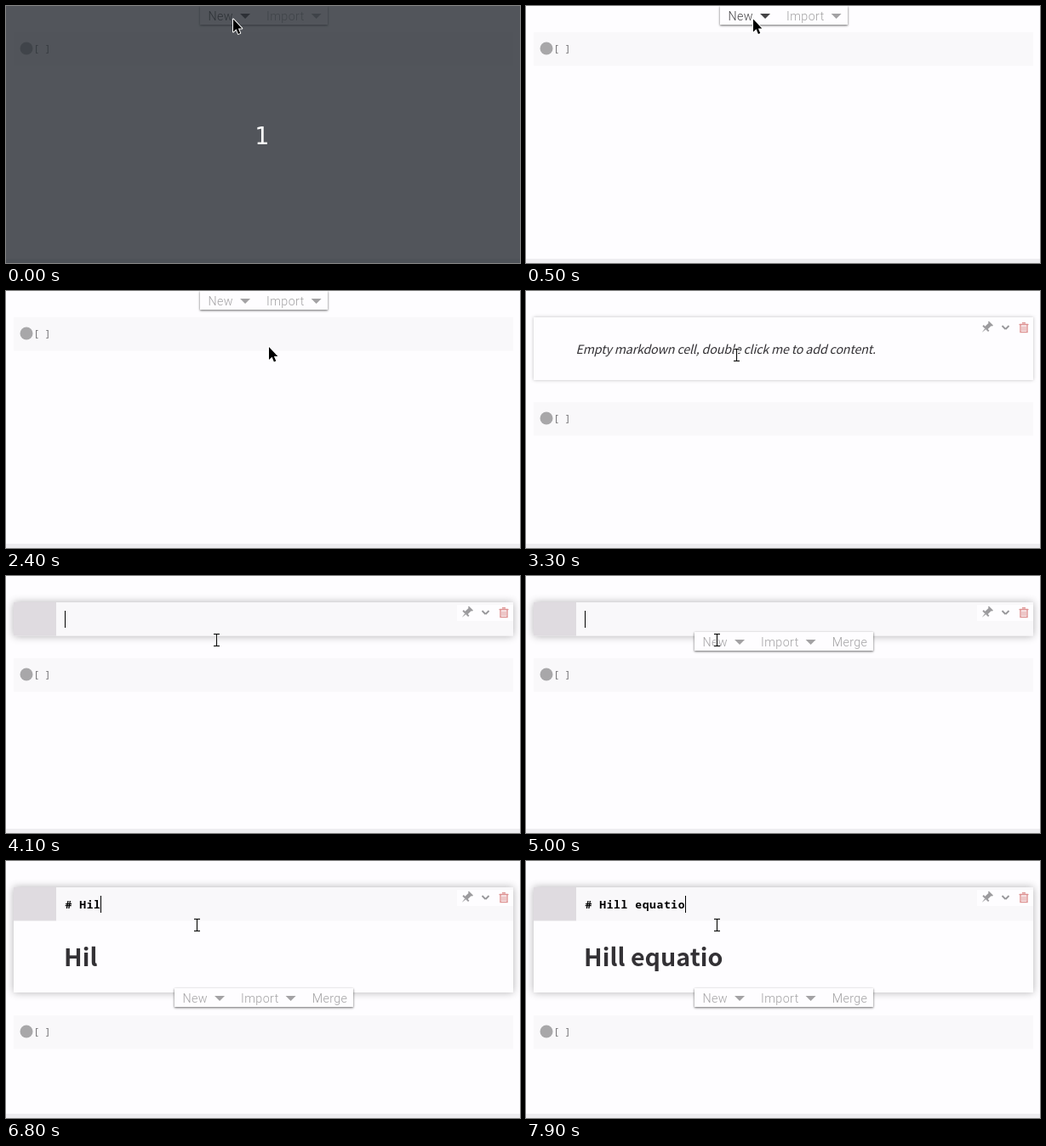
These frames come from a looping animation (604 by 303 pixels, 8 s). An HTML page with a canvas:

```html
<!DOCTYPE html>
<html lang="en">
<head>
<meta charset="utf-8">
<title>Notebook cell editing</title>
<style>
html, body { margin: 0; width: 100%; height: 100%; overflow: hidden; background: #fefdff; }
canvas { display: block; }
</style>
</head>
<body>
<canvas id="stage" width="604" height="303"></canvas>
<script>
const ctx = document.getElementById('stage').getContext('2d');
const LOOP = 8000, STEP = 100;
const SANS = '"Noto Sans CJK JP", "Noto Sans CJK SC", "Noto Sans CJK", "Open Sans", sans-serif';
const MONO = '"Noto Sans Mono", monospace';
const PAGE = '#fefdff', PALE = '#f9f8fa', GREY = '#a3a2a4';
const MENU = ['New Python Cell', 'New Markdown Cell', 'New Model Cell', 'New OMEX Cell'];
const SOURCE = '# Hill equatio';

const clamp = v => Math.max(0, Math.min(1, v));
const progress = (t, start, end) => clamp((t - start) / (end - start));
const easeOut = (p, power) => 1 - (1 - p) ** power;

function pointerAt(t) {
  const pick = progress(t, 1200, 1800);
  const leave = progress(t, 2600, 3100);
  const settle = progress(t, 3200, 3300);
  const aside = progress(t, 4700, 5000);
  return {
    x: 267 + 42 * easeOut(pick, 4) - 61.5 * leave - 23 * aside,
    y: 15.5 + 50.5 * easeOut(pick, 1.35) + 6 * leave + 3.5 * settle
  };
}

// Typing gets faster towards the end of the line.
function typedAt(t) {
  if (t < 5700) return 0;
  return 1 + Math.floor((SOURCE.length - 1) * progress(t, 5700, 7900) ** 1.695);
}

function box(x, y, w, h, fill) {
  ctx.fillStyle = fill;
  ctx.fillRect(x, y, w, h);
}

function shadowBox(x, y, w, h, fill, blur, alpha, dy = 0) {
  ctx.save();
  ctx.shadowColor = `rgba(0,0,0,${alpha})`;
  ctx.shadowBlur = blur;
  ctx.shadowOffsetY = dy;
  box(x, y, w, h, fill);
  ctx.restore();
}

function text(str, x, y, font, color, spacing = 0, stroke = 0) {
  ctx.font = font;
  ctx.letterSpacing = spacing + 'px';
  ctx.fillStyle = ctx.strokeStyle = color;
  ctx.fillText(str, x, y);
  if (stroke) {
    ctx.lineWidth = stroke;
    ctx.strokeText(str, x, y);
  }
}

function line(x0, y0, x1, y1, color, width) {
  ctx.beginPath();
  ctx.moveTo(x0, y0);
  ctx.lineTo(x1, y1);
  ctx.strokeStyle = color;
  ctx.lineWidth = width;
  ctx.stroke();
}

// Triangle with a flat top, pointing down.
function wedge(x, y, w, h, fill) {
  ctx.beginPath();
  ctx.moveTo(x, y);
  ctx.lineTo(x + w, y);
  ctx.lineTo(x + w / 2, y + h);
  ctx.fillStyle = fill;
  ctx.fill();
}

function codeCell(y) {
  box(9, y, 587, 39.5, PALE);
  ctx.beginPath();
  ctx.arc(24, y + 19, 7.5, 0, 7);
  ctx.fillStyle = '#a8a7a9';
  ctx.fill();
  text('[ ]', 32.5, y + 23, '11px ' + MONO, '#6b6a6c');
}

function toolbar(x, y, alpha, labels, hover) {
  if (!alpha) return;
  ctx.save();
  ctx.globalAlpha = alpha;
  const width = labels.length > 2 ? 210 : 150;
  for (const blur of [2, 3]) shadowBox(x, y, width, 22, PAGE, blur, 0.33, 1);
  let left = x + 9.5;
  for (const label of labels) {
    const color = hover && label === 'New' ? '#444345' : GREY;
    text(label, left, y + 17, '300 14.3px Roboto, sans-serif', color, 0.4);
    left += ctx.measureText(label).width;
    if (label !== 'Merge') wedge(left + 8, y + 9, 12, 6, color);
    left += 39;
  }
  ctx.restore();
}

function menu(pointerY) {
  const hot = Math.floor((pointerY - 18) / 29);
  shadowBox(260, 14, 186, 122, '#98979a', 4, 0.25, 1);
  box(261, 15, 184, 120, PAGE);
  MENU.forEach((label, i) => {
    const y = 17 + i * 29;
    if (i === hot) box(260, y, 186, 29, '#478ed6');
    text(label, 285.7, y + 20, '14.5px "Noto Sans", sans-serif', i === hot ? '#fff' : '#2c2e30', 0.07, 0.35);
  });
}

function pin(x, y, color) {
  ctx.save();
  ctx.translate(x, y);
  ctx.rotate(Math.PI / 4);
  box(-3.5, -7, 7, 1.6, color);
  box(-2.3, -6, 4.6, 7, color);
  box(-4.7, 0.5, 9.4, 2, color);
  wedge(-0.8, 2.5, 1.6, 5.5, color);
  ctx.restore();
}

function bin(x, y, color) {
  line(x - 5.5, y - 3.5, x + 5.5, y - 3.5, color, 1.2);
  line(x - 2, y - 5.3, x + 2, y - 5.3, color, 1.4);
  ctx.strokeRect(x - 4, y - 3.5, 8, 9);
  for (const dx of [-2, 0, 2]) line(x + dx, y - 1.5, x + dx, y + 4, color, 1);
}

function actions() {
  pin(541.5, 43, '#9c9b9e');
  for (const side of [-4, 4]) line(563.5 + side, 41, 563.5, 45, '#97969a', 1.8);
  bin(585, 43, '#dd9090');
}

function renderedCell(focused) {
  shadowBox(9, 31, 587, 74, PAGE, focused ? 9 : 4, focused ? 0.3 : 0.25);
  text('Empty markdown cell, double click me to add content.', 58.5, 74,
    'italic 14.3px ' + SANS, '#333135', -0.18);
  actions();
}

function editorCell(typed, previewHeight) {
  shadowBox(9, 31, 587, 39.5 + previewHeight, PAGE, 9, 0.3);
  box(9, 31, 50, 39.5, '#dfdbe0');
  box(59, 31, 537, 39.5, PALE);
  box(530, 34, 66, 19, PAGE);
  actions();
  text(SOURCE.slice(0, typed), 69.5, 55.5, 'bold 13px ' + MONO, '#000', 0.6);
  box(Math.round(69 + typed * 8.4), 41, 1, 20, '#000');
  text(SOURCE.slice(2, typed), 68, 124, 'bold 28.65px ' + SANS, '#333135');
}

function arrow(x, y) {
  ctx.save();
  ctx.translate(x, y);
  ctx.scale(0.94, 0.94);
  const shape = new Path2D('M0 0V16L3.8 12.6L6.3 18.6L8.8 17.5L6.3 11.7H11Z');
  ctx.lineJoin = 'round';
  ctx.strokeStyle = '#fff';
  ctx.lineWidth = 2;
  ctx.stroke(shape);
  ctx.fillStyle = '#000';
  ctx.fill(shape);
  ctx.restore();
}

function iBeam(x, y) {
  for (const [color, width] of [['#fff', 3], ['#111', 1.2]]) {
    line(x, y - 6.5, x, y + 6.5, color, width);
    for (const end of [-7, 7]) line(x - 3.5, y + end, x + 3.5, y + end, color, width);
  }
}

function countdown() {
  box(0, 0, 604, 303, 'rgba(39,44,51,0.8)');
  ctx.textAlign = 'center';
  text('1', 300.5, 163, '28px "DejaVu Sans Mono", monospace', '#fff');
  ctx.textAlign = 'left';
}

function draw(t) {
  const { x, y } = pointerAt(t);
  const typed = typedAt(t);
  box(0, 0, 604, 303, PAGE);
  box(0, 298, 604, 5, '#eeedf0');

  if (t < 2500) {
    codeCell(31);
  } else if (t < 4100) {
    codeCell(131);
    renderedCell(t >= 4000);
  } else {
    const preview = typed > 2 ? 84.5 : typed ? 41 : 0;
    codeCell(Math.round(97 + preview));
    editorCell(typed, preview);
    toolbar(198, Math.floor(66 + preview), progress(t, 4700, 5000), ['New', 'Import', 'Merge'], false);
  }
  toolbar(228, 0, 1 - progress(t, 2600, 3100), ['New', 'Import'], t < 2400);

  if (t >= 900 && t < 2400) menu(y);
  if (t < 500) countdown();
  if (t < 2500) arrow(x, y);
  else iBeam(x, y);
}

function tick() {
  draw(Math.floor(performance.now() % LOOP / STEP) * STEP);
  requestAnimationFrame(tick);
}
tick();
</script>
</body>
</html>
```
